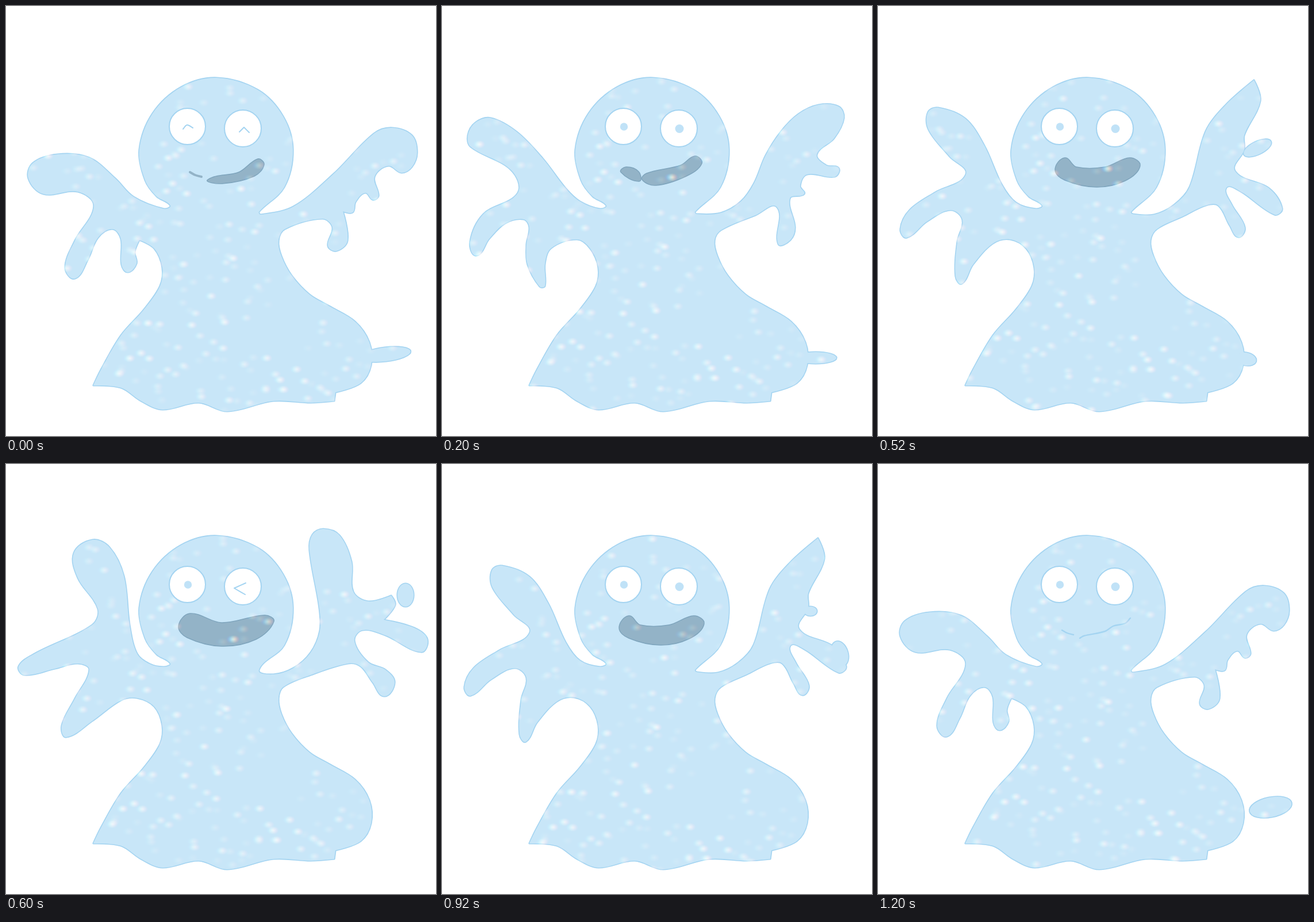
Write an HTML page with a canvas that moves like this. It is 748 px wide and 748 px high and loops after 1400 ms.

```html
<!DOCTYPE html>
<html lang="en">
<head>
<meta charset="utf-8">
<title>Slime ghost</title>
<style>
html, body { margin: 0; width: 100%; height: 100%; overflow: hidden; background: #fff; }
canvas { display: block; }
</style>
</head>
<body>
<canvas id="stage" width="748" height="748"></canvas>
<script>
const SIZE = 748, STEP = 200;
const SKIN = '#c8e6f8', EDGE = '#a4d4f1', PUPIL = '#c0e2f7', MOUTH = '#93b3c7', LIP = '#7fa5bd';
const ctx = document.getElementById('stage').getContext('2d');

// Smooth curve through "x,y" key points; a trailing ! marks a sharp corner.
function curve(text, closed = true) {
  const pts = text.trim().split(/\s+/).map(t => {
    const [x, y] = t.split(',').map(parseFloat);
    return { x, y, sharp: t.endsWith('!') };
  });
  const n = pts.length, path = new Path2D();
  const at = i => closed ? pts[(i + n) % n] : pts[Math.max(0, Math.min(n - 1, i))];
  const handle = (i, len) => {
    const p = at(i), a = at(i - 1), b = at(i + 1);
    const k = p.sharp ? 0 : len / 3 / Math.hypot(b.x - a.x, b.y - a.y);
    return [p.x + (b.x - a.x) * k, p.y + (b.y - a.y) * k];
  };
  path.moveTo(pts[0].x, pts[0].y);
  for (let i = 0; i < (closed ? n : n - 1); i++) {
    const p = at(i), q = at(i + 1), len = Math.hypot(q.x - p.x, q.y - p.y);
    path.bezierCurveTo(...handle(i, len), ...handle(i + 1, -len), q.x, q.y);
  }
  if (closed) path.closePath();
  return path;
}

function oval(x, y, rx, ry = rx, turn = 0) {
  const path = new Path2D();
  path.ellipse(x, y, rx, ry, turn, 0, Math.PI * 2);
  return path;
}

function fill(path, color) {
  ctx.fillStyle = color;
  ctx.fill(path);
}

function stroke(path, color, width) {
  ctx.strokeStyle = color;
  ctx.lineWidth = width;
  ctx.stroke(path);
}

// Parts that every pose shares.
const head = `275,353 286,347 262,331 242,303 232,250 255,187 305,141 367,125 438,146 482,192
  499,250 484,315 440,358`;
const skirt = `474,408 479,435 497,469 528,502 562,522 607,549 632,585 635,625 617,656 573,672! 571,687!
  530,690 465,687 385,705 335,690 272,702 235,687 200,664 152,660! 165,633 200,573 240,528 268,487
  272,455 258,422`;

const low = {
  right: `443,363 500,349 570,292 640,222 672,212 706,225 715,255 706,280 688,290 665,278 641,297
    648,330 638,337 625,325 608,341 603,359 586,357! 594,408 575,426 560,417 568,385 550,370 485,388`,
  left: `232,407! 224,428 227,448 212,463 201,450 200,405 185,388 160,403 142,442 120,474 103,455
    120,408 153,348 125,323 65,327 39,300 47,273 90,258 145,264 190,300 222,332`,
  smirk: '320,289 329,294 340,297',
  mouth: ['351,302 405,289 438,266 449,276 432,296 376,309']
};
const half = {
  right: `443,362 485,360 520,340 543,308 563,260 590,218 620,188 655,172 690,175 699,195 682,230
    652,258 668,277 690,282 683,297 635,293 623,313 630,327 605,335 614,385 606,407 585,414 583,350
    545,364 485,390`,
  left: `235,406 190,421 179,448 179,487 170,488 149,450 147,415 152,385 142,371 110,378 82,405
    60,434 49,410 72,362 132,325 120,285 50,245 45,225 58,203 85,195 130,219 175,265 215,317 240,340`,
  mouth: ['311,289 320,280 342,288 343,305', '348,302 356,291 415,277 440,261 452,274 425,296 372,312']
};
const high = {
  right: `443,362 480,363 515,346 542,315 570,218 605,172 654,129! 665,165 637,225 637,250 621,287
    680,317 703,352 690,363 630,322 606,316 615,345 638,385 627,402 612,382 592,347 570,347 530,366 485,388`,
  left: `230,406 200,413 165,450 146,483 135,470 138,410 147,372 126,355 85,375 50,403 39,388 55,355
    100,324 153,293 125,262 88,215 87,185 105,177 152,196 185,243 215,310 240,342`,
  mouth: ['308,285 325,264 345,280 395,280 438,264 456,278 430,304 380,315 325,303']
};
const peak = {
  right: `465,366 500,355 530,328 546,290 545,250 528,150 533,123 552,113 580,124 601,170 604,222
    630,239 670,229! 677,245 657,271! 710,285 733,305 722,327 660,298 620,289 606,308 630,345 660,358
    676,380 658,404 638,380 617,352 595,347 530,367 482,388`,
  left: `228,407 200,411 150,447 105,475 97,455 120,408 145,358 125,347 85,356 32,367 22,352 50,330
    150,280 160,252 125,198 118,155 150,132 180,145 205,195 215,280 228,330 250,348`,
  mouth: ['300,282 320,260 375,276 450,263 466,274 435,305 375,317 315,302']
};

const caret = '308,214 315,207 325,212', peakedCaret = '406,219 414,211! 423,220', wink = '417,207 397,216! 416,227';

// The arms rise and fall while a drip leaves the hand and lands by the skirt.
const steps = [
  { ...low, shift: [8, 20], drips: [[660, 606, 44, 12, -0.12]], looks: [caret, peakedCaret] },
  { ...half, shift: [0, 0], drips: [[650, 612, 36, 10, 0]] },
  { ...high, shift: [0, -15], drips: [[640, 614, 18, 11, 0.2], [660, 247, 26, 11, -0.45]] },
  { ...peak, shift: [-4, 7], drips: [[695, 228, 14, 20, 0]], looks: [null, wink] },
  { ...high, shift: [-14, 39], drips: [[692, 330, 14, 22, -0.3], [641, 256, 11, 8, 0]] },
  { ...half, shift: [34, 34], drips: [[693, 437, 13, 18, -0.5]] },
  { ...low, shift: [13, -5], drips: [[683, 597, 37, 17, -0.2]], mouth: [],
    smirk: '320,289 329,294 340,297', grin: '351,303 358,299 395,291 409,282 430,277 439,268' }
];

let seed = 11;
const rand = () => (seed = seed * 16807 % 2147483647) / 2147483647;
const stars = Array.from({ length: 460 }, () => ({
  x: rand() * SIZE,
  y: 60 + 660 * rand() ** 0.75,
  power: 0.12 + 0.7 * rand() ** 2
}));

// Screened red, green and blue glows, slightly apart, give a prismatic fringe.
const glows = ['#f00', '#0f0', '#00f'].map(color => {
  const g = ctx.createRadialGradient(0, 0, 0, 0, 0, 9);
  g.addColorStop(0, color);
  g.addColorStop(0.4, color + '9');
  g.addColorStop(1, color + '0');
  return g;
});

function glitter([dx, dy]) {
  ctx.save();
  ctx.globalCompositeOperation = 'screen';
  for (const { x, y, power } of stars) {
    ctx.globalAlpha = power;
    glows.forEach((glow, i) => {
      ctx.setTransform(1, 0, 0, 0.8, x + dx + 3 - 3 * i, y + dy);
      ctx.fillStyle = glow;
      ctx.fillRect(-9, -9, 18, 18);
    });
  }
  ctx.restore();
}

function drawEyes(looks = []) {
  [[315.5, 209.5, 31.5, 6.7], [412, 213, 32, 7.5]].forEach(([x, y, r, pupil], i) => {
    const eye = oval(x, y, r);
    fill(eye, '#fff');
    stroke(eye, EDGE, 2);
    if (looks[i]) stroke(curve(looks[i], false), EDGE, 2);
    else fill(oval(x + 1, y + 0.5, pupil), PUPIL);
  });
}

function draw({ right, left, drips, mouth, smirk, grin, looks, shift }) {
  fill(oval(SIZE / 2, SIZE / 2, SIZE), '#fff');
  ctx.lineJoin = ctx.lineCap = 'round';

  // Outlines first, so touching shapes merge.
  const slime = [curve([head, right, skirt, left].join(' ')), ...drips.map(d => oval(...d))];
  slime.forEach(s => stroke(s, EDGE, 3.2));
  slime.forEach(s => fill(s, SKIN));

  for (const m of mouth.map(m => curve(m))) {
    fill(m, MOUTH);
    stroke(m, LIP, 1.4);
  }
  if (smirk) stroke(curve(smirk, false), grin ? EDGE : MOUTH, grin ? 2.4 : 4);
  if (grin) stroke(curve(grin, false), EDGE, 2.4);
  glitter(shift);
  drawEyes(looks);
}

let shown = -1;
function tick() {
  const i = Math.floor(performance.now() / STEP) % steps.length;
  if (i !== shown) draw(steps[shown = i]);
  requestAnimationFrame(tick);
}
tick();
</script>
</body>
</html>
```
